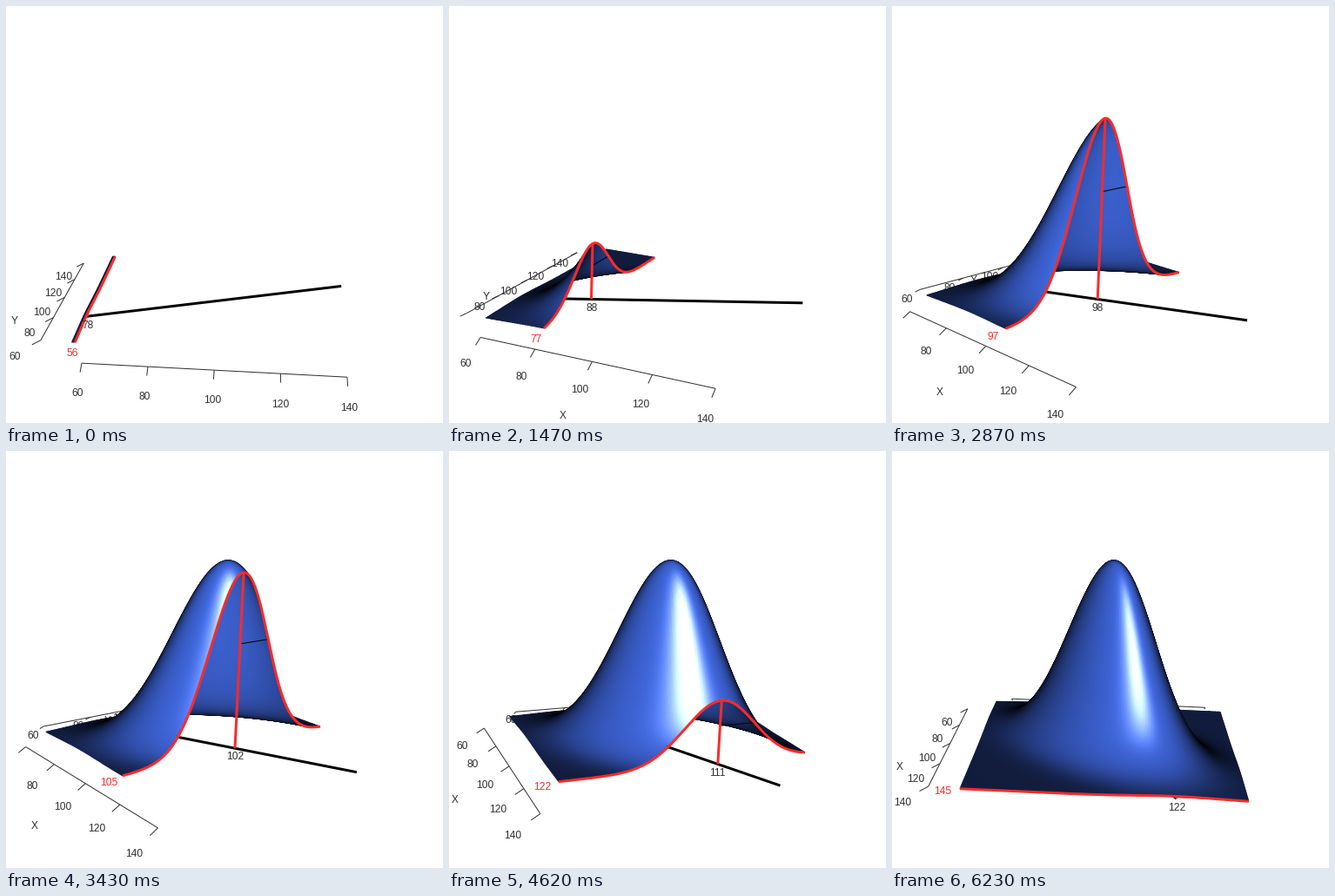
A matplotlib script for the animation above (6300 ms loop, 502 px wide and 480 px high).

```python
"""Bivariate normal surface revealed slice by slice while the view turns."""
import numpy as np
import matplotlib.pyplot as plt
from matplotlib.animation import FuncAnimation
from matplotlib.collections import TriMesh
from matplotlib.tri import Triangulation

W, H, DPI = 502, 480, 64
FRAMES, INTERVAL = 90, 70
PT = 72 / DPI                       # points per pixel

# Distribution
MEAN, SD, RHO = 100, 15, 0.5
HALF = 3 * SD
COND_SD = SD * np.sqrt(1 - RHO ** 2)

# Camera
TILT, ROLL = np.radians(15), np.radians(2.6)
DIST, FOCAL = 7.412, 1101
FLOOR, PEAK = -0.7075, 1.483

# Axes, in scene units
AXIS_OUT, AXIS_DOWN = 1.241, -0.749
TICKS = range(60, 141, 20)

RED, INK = "#fa2b2b", "#303030"
BLUE = np.array([65, 105, 225]) / 255
GAIN = 1.04                         # strength of the headlight

fig = plt.figure(figsize=(W / DPI, H / DPI), dpi=DPI, facecolor="white")
ax = fig.add_axes([0, 0, 1, 1])


def unit(value):
    return (np.asarray(value, float) - MEAN) / HALF


def height(u, v):
    x, y = 3 * u, 3 * v
    return PEAK * np.exp(-(x * x - 2 * RHO * x * y + y * y) / (2 * (1 - RHO ** 2)))


def normalize(vec):
    return vec / np.linalg.norm(vec, axis=-1, keepdims=True)


class View:
    """Perspective view turned about the vertical axis."""

    def __init__(self, degrees):
        t = np.radians(degrees)
        self.c, self.s = np.cos(t), np.sin(t)
        self.light = np.array([np.cos(TILT) * self.s, -np.cos(TILT) * self.c,
                               np.sin(TILT)])
        self.eye = DIST * self.light

    def project(self, u, v, w):
        a = u * self.c + v * self.s
        b = v * self.c - u * self.s
        scale = FOCAL / (DIST + b * np.cos(TILT) - w * np.sin(TILT))
        x = a * scale
        y = (w * np.cos(TILT) + b * np.sin(TILT)) * scale
        return (W / 2 + x * np.cos(ROLL) + y * np.sin(ROLL),
                H / 2 + x * np.sin(ROLL) - y * np.cos(ROLL))


def line(view, u, v, w, color="black", width=1, z=3):
    u, v, w = np.broadcast_arrays(u, v, w)
    x, y = view.project(u, v, w)
    ax.plot(x, y, color=color, lw=width * PT, zorder=z,
            solid_capstyle="butt", solid_joinstyle="round")


def label(view, u, v, w, text, color=INK, z=6):
    x, y = view.project(u, v, w)
    x, y = x + 0.5, y + 3.4
    # a label whose starting point leaves the window is dropped whole
    if x - 3.34 * len(text) < 0 or y + 4.3 > H:
        return
    ax.text(x, y, text, color=color, fontsize=12 * PT, family="Liberation Sans",
            ha="center", va="center", zorder=z)


def draw_axis(view, name, z):
    def place(t, out=1.0, down=None):
        side = -AXIS_OUT * out
        w = AXIS_DOWN * (out if down is None else down)
        return (t, side, w) if name == "X" else (side, t, w)

    def segment(p, q):
        line(view, *np.transpose([p, q]), color=INK, z=z)

    segment(place(unit(60)), place(unit(140)))
    for tick in TICKS:
        t = unit(tick)
        segment(place(t), place(t, 1.05))
        label(view, *place(t, 1.15), str(tick), z=z)
    label(view, *place(0.0, 1.33, 1.268), name, z=z)


def shade(view, u, v, h):
    x, y = 3 * u, 3 * v
    k = 3 * h / (1 - RHO ** 2)
    n = normalize(np.stack([k * (x - RHO * y), k * (y - RHO * x),
                            np.ones_like(h)], axis=-1))
    to_eye = normalize(view.eye - np.stack([u, v, h + FLOOR], axis=-1))
    n = n * np.where((n * to_eye).sum(-1) < 0, -1, 1)[..., None]
    half = normalize(to_eye + view.light)
    diffuse = np.clip(GAIN * (n * view.light).sum(-1), 0, 1)
    gloss = np.clip((n * half).sum(-1), 0, 1) ** 50
    return np.clip(BLUE * diffuse[..., None] + gloss[..., None], 0, 1)


def draw_surface(view, x_cut):
    # rows run from the far side to the near side
    xs = unit(np.arange(MEAN - HALF, x_cut + 1))
    ys = unit(np.arange(MEAN + HALF, MEAN - HALF - 1, -1))
    u, v = (g.ravel() for g in np.meshgrid(xs, ys, indexing="ij"))
    h = height(u, v)
    px, py = view.project(u, v, h + FLOOR)

    idx = np.arange(u.size).reshape(len(xs), len(ys))
    a, b, c, d = idx[:-1, :-1], idx[:-1, 1:], idx[1:, :-1], idx[1:, 1:]
    tris = np.stack([a, b, c, b, d, c], axis=-1).reshape(-1, 3)
    mesh = TriMesh(Triangulation(px, py, tris), zorder=2)
    rgb = shade(view, u, v, h)
    mesh.set_facecolor(np.column_stack([rgb, np.ones(len(rgb))]))
    ax.add_collection(mesh, autolim=False)


def draw_regression(view, cut):
    u = np.linspace(-1, 1, 240)
    pts = np.stack([u, RHO * u, np.full_like(u, FLOOR)], axis=-1)
    # follow each sight line and see whether it breaks through the surface
    t = np.linspace(0, 0.35, 120)[:, None, None]
    ray = pts + t * (view.eye - pts)
    ru, rv, rw = ray[..., 0], ray[..., 1], ray[..., 2] - FLOOR
    inside = (abs(rv) <= 1) & (ru <= cut)
    hidden = (inside & (rw > height(ru, rv))).any(axis=0)
    w = np.where(hidden, np.nan, FLOOR)
    line(view, u, RHO * u, w, width=3, z=3)


def draw_slice(view, x_cut):
    cut = unit(x_cut)
    mid = RHO * cut
    top = height(cut, mid)

    sd_level = FLOOR + top * np.exp(-0.5)
    line(view, cut, [mid, mid + COND_SD / HALF], sd_level, z=4)

    v = np.linspace(-1, 1, 181)
    line(view, cut, v, FLOOR + height(cut, v), RED, 3, z=5)
    line(view, cut, mid, [FLOOR, FLOOR + top], RED, 3, z=5)

    mean_text = str(round(MEAN + RHO * (x_cut - MEAN)))
    label(view, cut, mid, FLOOR - 0.05, mean_text)
    label(view, cut, unit(49.5), FLOOR - 0.003, str(x_cut), RED)


def update(i):
    ax.clear()
    ax.set(xlim=(0, W), ylim=(H, 0))
    ax.axis("off")
    view = View(i + 1)
    x_cut = 56 + i
    draw_axis(view, "Y", 1)
    draw_surface(view, x_cut)
    draw_regression(view, unit(x_cut))
    draw_slice(view, x_cut)
    draw_axis(view, "X", 6)


anim = FuncAnimation(fig, update, frames=FRAMES, interval=INTERVAL,
                     init_func=lambda: None, repeat=True, repeat_delay=0)
plt.show()
```
